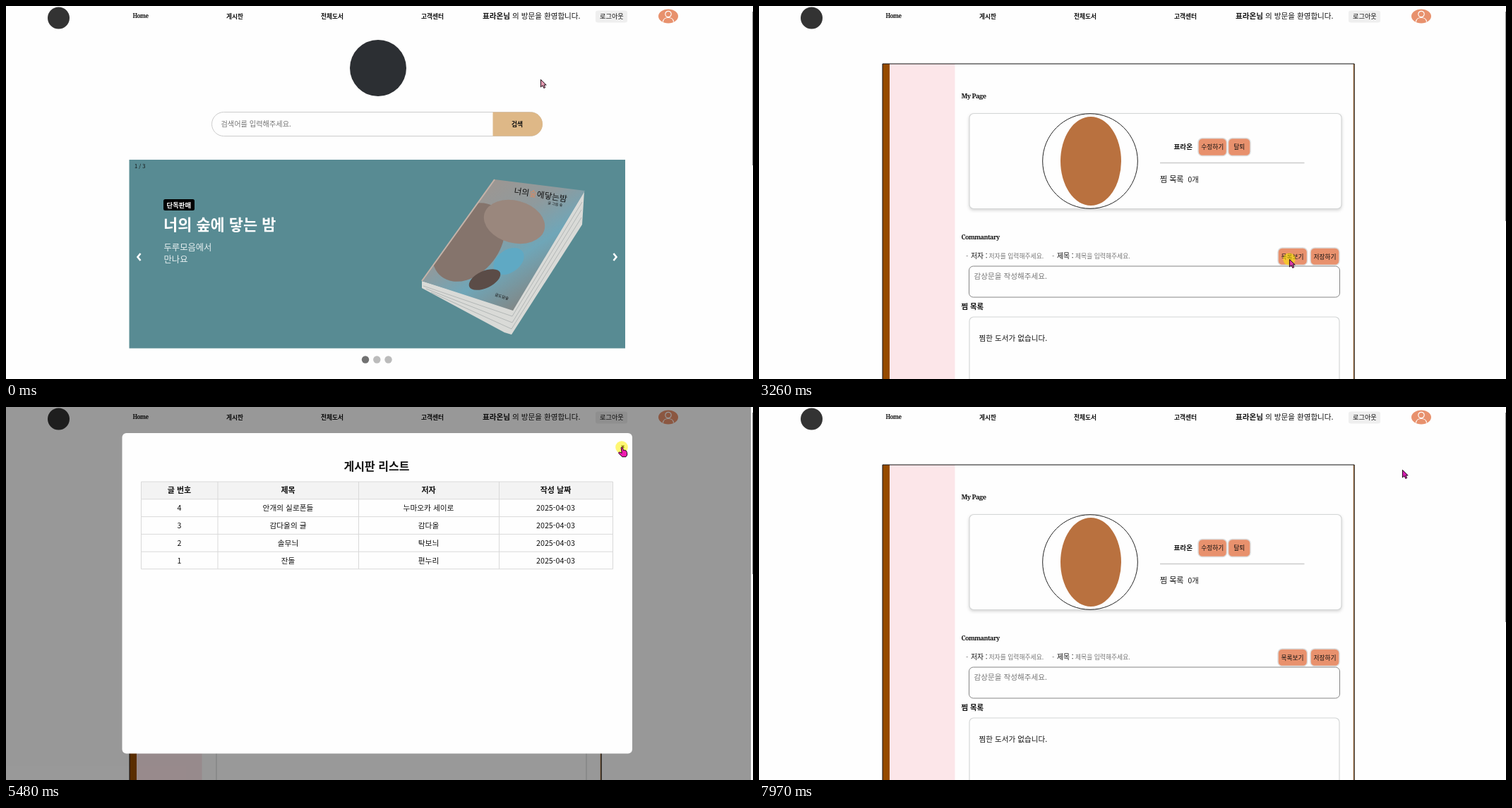
An HTML page that plays this animation: 1058 px wide and 529 px high, repeating every 8000 ms.

```html
<!DOCTYPE html>
<html lang="ko">
<head>
<meta charset="utf-8">
<title>도서 페이지</title>
<style>
html, body { margin: 0; width: 100%; height: 100%; overflow: hidden; background: #fefefe; }
svg { display: block; width: 100%; height: 100%; }
text { font-family: "Noto Sans CJK KR", "Noto Sans CJK", "Noto Sans", sans-serif; fill: #111; white-space: pre; }
.b { font-weight: 700; }
.mid { text-anchor: middle; }
.hint { fill: #757575; }
.serif { font-family: "Noto Serif", serif; font-weight: 700; letter-spacing: -.06em; }
.btn rect { fill: #e8916d; stroke: #ddd; stroke-width: 1.5; }
.btn text { font-size: 8.7px; font-weight: 500; }
.card { fill: #fefefe; stroke: #d4d6d6; stroke-width: 1.2; }
.shade { filter: drop-shadow(0 2px 2px rgba(0, 0, 0, .16)); }
.thumb { fill: #8e8e8e; }

#home, #mypage, #list, #arrow, #hand, #press { animation: 8s step-end infinite; }
#home { animation-name: home; }
#mypage { animation-name: mypage; }
#list { animation-name: list; }
#arrow { animation-name: arrow; }
#hand { animation-name: hand; }
#press { animation-name: press; }
#face { animation: hover 8s linear infinite; }
#cursor { animation: move 8s linear infinite, tint 8s linear infinite; }

@keyframes home { 0% { visibility: visible } 21.125%, 100% { visibility: hidden } }
@keyframes mypage { 0% { visibility: hidden } 21.125%, 100% { visibility: visible } }
@keyframes list { 0%, 70.125%, 100% { visibility: hidden } 41.75% { visibility: visible } }
@keyframes hand { 0%, 22%, 70.125%, 100% { visibility: hidden } 17.6%, 61.125% { visibility: visible } }
@keyframes arrow { 0%, 22%, 70.125%, 100% { visibility: visible } 17.6%, 61.125% { visibility: hidden } }
@keyframes press {
  0%, 20.25%, 41.75%, 70.125%, 100% { visibility: hidden }
  19.375%, 40.75%, 68.5% { visibility: visible }
}
@keyframes hover { 0%, 17.3%, 23.5%, 100% { opacity: 1 } 18.6%, 21.9% { opacity: .7 } }
@keyframes tint {
  0%, 9% { fill: #e59cb2 }
  20%, 30% { fill: #e01ea6 }
  42% { fill: #dc40a8 }
  61%, 70% { fill: #f01cb0 }
  70.2%, 74% { fill: #d0559f }
  96%, 100% { fill: #d81cb2 }
}
@keyframes move {
  0% { transform: translate(757px, 104px) }
  9% { transform: translate(757px, 104px); animation-timing-function: ease-in-out }
  18.1% { transform: translate(938px, 14px) }
  21.6% { transform: translate(938px, 14px); animation-timing-function: ease-in }
  29% { transform: translate(847px, 252px); animation-timing-function: ease-out }
  35.8% { transform: translate(760px, 366px); animation-timing-function: ease-in-out }
  39.1% { transform: translate(751px, 359px) }
  46.6% { transform: translate(751px, 359px); animation-timing-function: ease-in-out }
  57.1% { transform: translate(878px, 58px) }
  61.1% { transform: translate(878px, 58px) }
  61.125% { transform: translate(872px, 57px) }
  73.5% { transform: translate(872px, 57px); animation-timing-function: ease-in }
  78.6% { transform: translate(1062px, 52px) }
  96.86% { transform: translate(1062px, 52px) }
  96.87% { transform: translate(1032px, 0); animation-timing-function: ease-out }
  99.6%, 100% { transform: translate(911px, 89px) }
}
</style>
</head>
<body>
<svg viewBox="0 0 1058 529" preserveAspectRatio="none">
  <defs>
    <linearGradient id="cover" x1="0" y1="0" x2=".8" y2="1">
      <stop offset="0" stop-color="#a99388"/>
      <stop offset=".45" stop-color="#8f9a9d"/>
      <stop offset=".65" stop-color="#6fa6b8"/>
      <stop offset="1" stop-color="#8a786e"/>
    </linearGradient>
    <clipPath id="coverClip"><path d="M692 246 820 262 718 432 589 390Z"/></clipPath>
  </defs>

  <!-- header -->
  <circle cx="74.5" cy="17" r="15.5" fill="#333"/>
  <text class="serif" x="179.5" y="17" font-size="8">Home</text>
  <g class="b" font-size="8.7">
    <text x="312" y="17.5">게시판</text>
    <text x="446" y="17.5">전체도서</text>
    <text x="588" y="17.5">고객센터</text>
  </g>
  <text x="675" y="18" font-size="10.6"><tspan class="b">표라온님</tspan> 의 방문을 환영합니다.</text>
  <rect x="835" y="6.5" width="45" height="17" rx="3" fill="#efefef"/>
  <text x="841" y="18" font-size="9.2">로그아웃</text>
  <g id="face">
    <ellipse cx="938" cy="14.5" rx="14" ry="10" fill="#e8916d"/>
    <g fill="none" stroke="#fff" stroke-width="1.2">
      <circle cx="938" cy="11.5" r="4.2"/>
      <path d="M930.5 22.5C931 14.500 945 14.500 945.500 22.500"/>
    </g>
  </g>

  <!-- home -->
  <g id="home">
    <circle cx="527" cy="88" r="40" fill="#2c2f33"/>
    <rect x="291.500" y="150.500" width="468" height="34" rx="17" fill="#fefefe" stroke="#ccc"/>
    <path d="M689.500 150.500H743a17 17 0 0 1 0 34H689.500Z" fill="#deb887"/>
    <text class="hint" x="304.500" y="171" font-size="10.200">검색어를 입력해주세요.</text>
    <text class="b mid" x="724" y="170.500" font-size="8.700">검색</text>

    <rect x="174.500" y="218" width="702.500" height="267.500" fill="#588b93"/>
    <text x="182" y="230" font-size="7.500" font-weight="500">1 / 3</text>
    <rect x="223" y="274" width="44" height="16" rx="2.500"/>
    <g style="--c:#fff">
      <text class="b" x="227.500" y="285.500" font-size="9.400" style="fill:#fff">단독판매</text>
      <text class="b" x="223" y="317.500" font-size="21.900" style="fill:#fff">너의 숲에 닿는 밤</text>
      <text x="223.500" y="347" font-size="12.300" style="fill:#e9f1f2">두루모음에서</text>
      <text x="223.500" y="364" font-size="12.300" style="fill:#e9f1f2">만나요</text>
    </g>
    <g fill="none" stroke="#fff" stroke-width="2.600">
      <path d="M190.500 351 186.500 356 190.500 361"/>
      <path d="M860.500 351 864.500 356 860.500 361"/>
    </g>

    <!-- book -->
    <path d="M589 390 718 430 819 263 816 310 716 466 706 463 589 400Z" fill="#d9dad7"/>
    <g fill="none" stroke="#a9aeae" stroke-width=".8">
      <path d="M591 397 717 440 816 278"/>
      <path d="M595 401 717 449 815 289"/>
      <path d="M602 406 716 458 815 300"/>
    </g>
    <path d="M692 246 820 262 718 432 589 390Z" fill="url(#cover)"/>
    <g clip-path="url(#coverClip)">
      <ellipse cx="655" cy="335" rx="62" ry="44" transform="rotate(-52 655 335)" fill="#85746c"/>
      <ellipse cx="720" cy="306" rx="44" ry="30" transform="rotate(15 720 306)" fill="#9a877d"/>
      <ellipse cx="712" cy="362" rx="24" ry="16" transform="rotate(-35 712 362)" fill="#5fa9c4"/>
      <ellipse cx="678" cy="388" rx="24" ry="12" transform="rotate(-25 678 388)" fill="#5b4c47"/>
    </g>
    <path d="M692 246 589 390" stroke="#c5b3a9" stroke-width="2"/>
    <text transform="translate(719 266) rotate(9)" font-size="11.800" font-weight="500">너의<tspan style="fill:#d98a62">숲</tspan>에닿는밤</text>
    <text transform="translate(767 281) rotate(9)" font-size="5">글 그림 숲</text>
    <text transform="translate(692 411) rotate(17)" font-size="5.500">글도담숲</text>

    <circle cx="509" cy="501.500" r="5.200" fill="#717171"/>
    <circle cx="525.300" cy="501.500" r="5.200" fill="#bbb"/>
    <circle cx="541.500" cy="501.500" r="5.200" fill="#bbb"/>
    <rect class="thumb" x="1057" y="8" width="1" height="218"/>
  </g>

  <!-- my page -->
  <g id="mypage">
    <rect x="175" y="82" width="10" height="447" fill="#964b00"/>
    <rect x="185" y="82" width="92.500" height="447" fill="#fce6e9"/>
    <path d="M842.300 82V529" stroke="#964b00"/>
    <path d="M175 529V82H843.200V529" fill="none" stroke="#111"/>

    <text class="serif" x="286.500" y="131" font-size="9.400">My Page</text>
    <rect class="card shade" x="298" y="152.500" width="527" height="135" rx="6"/>
    <ellipse cx="470" cy="220" rx="43" ry="63" fill="#b9713f"/>
    <circle cx="469" cy="220" r="67.300" fill="none" stroke="#222"/>
    <text class="b" x="587.500" y="203" font-size="9.600">표라온</text>
    <g class="btn">
      <rect x="622" y="187.500" width="40.500" height="25" rx="6"/>
      <text class="mid" x="642.300" y="203">수정하기</text>
      <rect x="664.500" y="187.500" width="31.500" height="25" rx="6"/>
      <text class="mid" x="680.200" y="203">탈퇴</text>
      <rect x="735" y="343" width="41.500" height="24.500" rx="6"/>
      <text class="mid" x="755.500" y="358.500">목록보기</text>
      <rect x="781" y="343" width="41" height="24.500" rx="6"/>
      <text class="mid" x="801.500" y="358.500">저장하기</text>
    </g>
    <path d="M568 222.500H772.500" stroke="#ccc" stroke-width="1.500"/>
    <text x="568" y="250" font-size="11">찜 목록</text>
    <text x="607.500" y="250" font-size="10.300">0개</text>

    <text class="serif" x="286.500" y="331" font-size="9">Commantary</text>
    <g font-size="9.800" font-weight="500">
      <text class="hint" x="293" y="358">-</text>
      <text x="300" y="358">저자 :</text>
      <text class="hint" x="415" y="358">-</text>
      <text x="422" y="358">제목 :</text>
    </g>
    <text class="hint" x="325.500" y="358" font-size="8.800">저자를 입력해주세요.</text>
    <text class="hint" x="448" y="358" font-size="8.800">제목을 입력해주세요.</text>
    <rect x="297.500" y="369" width="525" height="44" rx="6" fill="#fefefe" stroke="#858585"/>
    <text class="hint" x="304.500" y="387" font-size="10.600">감상문을 작성해주세요.</text>
    <text class="b" x="286.500" y="430" font-size="10.400">찜 목록</text>
    <rect class="card" x="298" y="441" width="524" height="120" rx="6"/>
    <text x="311.500" y="475" font-size="10.600">찜한 도서가 없습니다.</text>
    <rect class="thumb" x="1057" y="8" width="1" height="297"/>
  </g>

  <!-- post list dialog -->
  <g id="list">
    <rect width="1055" height="529" fill-opacity=".4"/>
    <rect x="1055" width="3" height="529" fill="#fafafa"/>
    <rect class="thumb" x="1057" y="8" width="1" height="229"/>
    <rect x="164.500" y="37" width="722.500" height="454.500" rx="6" fill="#fefefe"/>
    <path d="M872 54.500l3.400 3.400m0-3.400l-3.400 3.400" stroke="#111" stroke-width="1.400"/>
    <text class="b mid" x="525" y="90" font-size="16">게시판 리스트</text>
    <rect x="191.500" y="106" width="668" height="24.800" fill="#f3f3f3"/>
    <path d="M191.500 106H859.500V229.800H191.500ZM300 106V229.800M499.500 106V229.800M698.500 106V229.800M191.500 130.800H859.500m-668 24.800h668m-668 24.800h668m-668 24.800h668" fill="none" stroke="#d9d9d9"/>
    <g id="rows"></g>
  </g>

  <!-- pointer -->
  <g id="cursor" stroke="#1c0a16" stroke-linejoin="round">
    <circle id="press" r="8.800" fill="#fff000" fill-opacity=".55" stroke="none"/>
    <path id="arrow" d="M.4.300V11L3 8.700 4.800 12.500 6.700 11.600 5 8H8.200Z"/>
    <path id="hand" d="M-.800.800C-.200-.600 1-.300 1.300.800L2.600 4.600 4.600 4.200 6.200 5 7.600 7.500 7.800 11 6 13.700H.8L-4.300 8.500C-4.600 7.200-3.300 6.700-2.300 7.300L.2 8.300Z"/>
  </g>
</svg>
<script>
const columns = [245.5, 399.5, 598.5, 778.5];
const day = '2025-04-03';
const rows = [
  ['글 번호', '제목', '저자', '작성 날짜'],
  ['4', '안개의 실로폰들', '누마오카 세이로', day],
  ['3', '감다올의 글', '감다올', day],
  ['2', '솔무늬', '탁보늬', day],
  ['1', '잔돌', '편누리', day]
];
document.getElementById('rows').innerHTML = rows.map((row, r) =>
  row.map((cell, c) =>
    `<text class="mid${r ? '' : ' b'}" x="${columns[c]}" y="${122.3 + r * 24.8}" font-size="${r ? 10.7 : 11}">${cell}</text>`
  ).join('')).join('');
</script>
</body>
</html>
```
